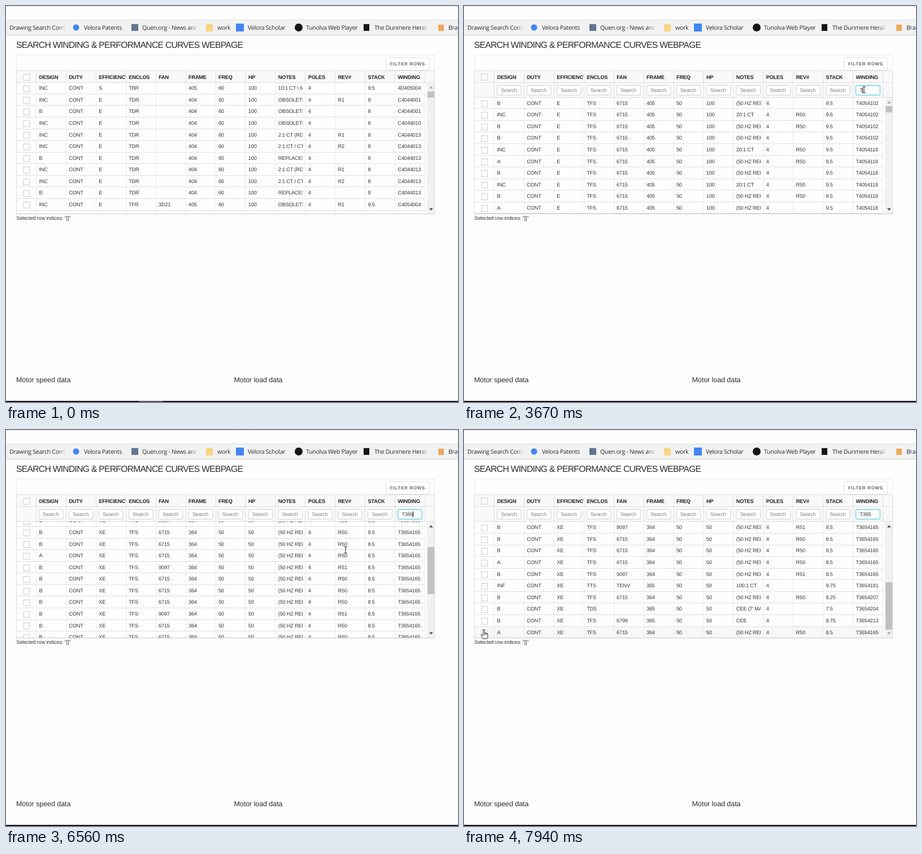
Write an HTML page that moves like this. It is 800 px wide and 700 px high and loops after 8000 ms.

```html
<!DOCTYPE html>
<html lang="en">
<head>
<meta charset="utf-8">
<title>Winding search</title>
<style>
html, body { margin: 0; width: 100%; height: 100%; overflow: hidden; background: #fefefe; }
svg { display: block; width: 800px; height: 700px; }
text { font: 9.2px 'Liberation Sans', Arial, sans-serif; letter-spacing: -.18px; fill: #363636; white-space: pre; text-rendering: geometricPrecision; }
.head { font-weight: bold; letter-spacing: -.22px; fill: #222; }
.title { font-size: 15.6px; letter-spacing: -.67px; fill: #2b2b2b; }
.sub { font-size: 12.5px; letter-spacing: -.06px; fill: #2b2b2b; }
.btn { font-size: 8.1px; font-weight: bold; letter-spacing: .63px; fill: #686868; }
.mark { font: 10.6px 'Open Sans', 'Noto Sans', sans-serif; letter-spacing: -.3px; fill: #2c2c2c; }
.hint { fill: #808080; }
.line { shape-rendering: crispEdges; }
</style>
</head>
<body>
<svg id="stage" viewBox="0 0 800 700" xmlns="http://www.w3.org/2000/svg">
  <defs>
    <linearGradient id="fade"><stop offset="0" stop-color="#f2f2f2" stop-opacity="0"/><stop offset="1" stop-color="#f2f2f2"/></linearGradient>
    <clipPath id="view"><rect id="viewRect" x="18" width="728"/></clipPath>
    <clipPath id="notes"><rect x="477" y="-50" width="48.2" height="900"/></clipPath>
    <clipPath id="eff"><rect x="159" y="110" width="54" height="30"/></clipPath>
  </defs>
</svg>
<script>
const NS = 'http://www.w3.org/2000/svg';
const stage = document.getElementById('stage');
const LOOP = 8000, ROW = 20.58, COL = 52.92, COL0 = 53.6, TOP = 135.2, FILTER = 26.46, BOTTOM = 368.2;
const MAX_SCROLL = 225.7;
const NAMES = 'DESIGN DUTY EFFICIENCY ENCLOS FAN FRAME FREQ HP NOTES POLES REV# STACK WINDING'.split(' ');
const colX = i => COL0 + COL * i;

function el(tag, attrs, parent = stage) {
  const e = document.createElementNS(NS, tag);
  for (const k in attrs) e.setAttribute(k, attrs[k]);
  parent.appendChild(e);
  return e;
}
function label(s, x, y, cls = '', parent = stage) {
  const e = el('text', { x, y, class: cls }, parent);
  e.textContent = s;
  return e;
}
const box = (x, y, width, height, fill, parent) =>
  el('rect', { x, y, width, height, fill, class: 'line' }, parent);
const disc = (cx, cy, r, fill) => el('circle', { cx, cy, r, fill });
const show = (e, on) => e.setAttribute('display', on ? 'inline' : 'none');
const check = (cy, parent) => el('rect', { x: 31, y: cy - 5.2, width: 10.6, height: 10.6, fill: '#fff', stroke: '#d6d6d6', 'stroke-width': 1.3 }, parent);

// Browser chrome
box(0, 0, 800, 1, '#dcdcdc');
box(0, 24, 800, 28, '#f2f2f2');
box(0, 24, 800, 1, '#dedede');
box(0, 51, 800, 1, '#cfcfcf');

function bookmark(s, x, end) {
  label(s, x, 42, 'mark');
  if (!end) return;
  el('rect', { x: end - 14, y: 27, width: 14, height: 22, fill: 'url(#fade)' });
  box(end, 27, 30, 22, '#f2f2f2');
}
bookmark('Drawing Search Comp', 6, 106);
bookmark('Velora Patents', 138);
bookmark('Quen.org - News and', 241, 339);
bookmark('work', 374);
bookmark('Velora Scholar', 428);
bookmark('Tunolva Web Player', 531);
bookmark('The Dunmere Herald', 652, 747);
bookmark('Bram', 783);
disc(124, 38, 5.5, '#4285f4');
box(222, 32, 12, 12, '#5d7690');
el('path', { d: 'M354 32h10l2 2v11h-12z', fill: '#f8d581' });
box(407, 31, 14, 14, '#4285f4');
disc(518, 38, 7, '#151515');
box(633, 32, 10, 12, '#151515');
box(765, 33, 10, 11, '#efa95c');

// Page
label('SEARCH WINDING & PERFORMANCE CURVES WEBPAGE', 18, 74, 'title');
label('Selected row indices: "[]"', 18.2, 378.3);
label('Motor speed data', 18, 664.5, 'sub');
label('Motor load data', 403.5, 664.5, 'sub');
box(0, 698, 800, 2, '#121212');
const task = box(235, 698, 43, 2, '#555');

el('rect', { x: 18.5, y: 86.5, width: 740, height: 28, fill: '#fefefe', stroke: '#ebebeb' });
const button = el('rect', { x: 672.5, y: 91.5, width: 77, height: 22, rx: 2, fill: '#fff', stroke: '#e0e0e0' });
label('FILTER ROWS', 679.8, 105, 'btn');

// Table rows
const xe = (design, fan, rev) => `${design}|CONT|XE|TFS|${fan}|364|50|50|(50 HZ REF|4|${rev}|8.5|T3654165`;
const tdr = (design, notes, rev, winding) => `${design}|CONT|E|TDR||404|60|100|${notes}|4|${rev}|8|${winding}`;
const tfs = (design, duty, notes, rev) => `${design}|${duty}|S|TFS|5117|364|50|50|${notes}|4|${rev}|7.75|T3644131`;
const big = (design, notes, rev, winding) => `${design}|CONT|E|TFS|6715|405|50|100|${notes}|4|${rev}|9.5|${winding}`;
const trio = [tdr('INC', '2:1 CT (RD', 'R1', 'C4044013'), tdr('INC', '2:1 CT / CT', 'R2', 'C4044013'), tdr('B', 'REPLACES', '', 'C4044013')];

const sets = [
  ['INC|CONT|S|TBR||405|60|100|10:1 CT \\ 60|4||9.5|4D405004',
    tdr('INC', 'OBSOLETE', 'R1', 'C4044001'), tdr('B', 'OBSOLETE', '', 'C4044001'), tdr('INC', 'OBSOLETE', '', 'C4044010'),
    ...trio, ...trio,
    'INC|CONT|E|TFR|3D21|405|60|100|OBSOLETE|4|R1|9.5|C4054004', ''],
  ['B', 'INC', 'B', 'B', 'INC', 'A', 'B', 'INC', 'B', 'A'].map((d, i) =>
    big(d, d === 'INC' ? '20:1 CT' : '(50 HZ REF', i % 3 ? 'R50' : '', i < 4 ? 'T4054102' : 'T4054118')),
  ['B|CONT|IE2|TDS||364|50|50|(50 HZ REF|4|R50|6|T3644126',
    'INC|CONT|IE2|TFS|5117|364|50|50|20:1 CT|4||7.75|T3644150',
    tfs('INC', 'CONT', '10:1 CT (50', 'R51'),
    'INF|CONT|S|TBS|5117|364|50|50|2-100:1 CT|4|R52|7.75|T3644131',
    'INF|60 M|S|TTS|TENV|364|50|50|100:1 CT -|4|R53|7.75|T3644131',
    ...Array(3).fill(tfs('INF', 'SPL', '100:1 CT (6', 'R54')),
    tfs('INC', 'SPL', '20:1 CT (60', 'R50'), tfs('INC', 'CONT', '10:1 CT (50', 'R51')],
  [xe('B', '6715', 'R50'),
    'INF|CONT|IE2|TFS|5117|364|50|50|100:1 CT|4||8.75|T3654228',
    ...[...'A9BBA9BBB9BBA9'].map(c => c === '9' ? xe('B', '9097', 'R51') : xe(c, '6715', 'R50')),
    'INF|CONT|XE|TTS|TENV|365|50|50|100:1 CT|4||9.75|T3654181',
    'B|CONT|XE|TFS|6715|364|50|50|(50 HZ REF|4|R50|8.25|T3654207',
    "B|CONT|XE|TDS||365|50|50|CEE (7' MAX|4||7.5|T3654204",
    'B|CONT|XE|TFS|6799|365|50|50|CEE|4||9.75|T3654213',
    xe('A', '6715', 'R50')]
];

const view = el('g', { 'clip-path': 'url(#view)' });
const viewRect = document.getElementById('viewRect');
const body = el('g', {}, view);
const hover = box(19, 0, 723, ROW - 1, '#f7f7f7', body);

function buildSet(rows) {
  const g = el('g', {}, body);
  const h = rows.length * ROW;
  for (let i = 0; i <= 13; i++) box(colX(i) - .6, 0, 1, h, '#ebebeb', g);
  rows.forEach((row, r) => {
    const y = r * ROW;
    box(19, y + ROW - 1, 723, 1, '#dfdfdf', g);
    check(y + 10.9, g);
    row.split('|').forEach((s, i) => {
      if (!s) return;
      const t = label(s, colX(i) + 4.8, y + 13, '', g);
      if (i === 8) t.setAttribute('clip-path', 'url(#notes)');
    });
  });
  return g;
}
const tables = sets.map(buildSet);

// Scrollbar
const track = box(745, 0, 14, 1, '#f1f1f1');
const thumb = box(746, 0, 12, 11, '#c1c1c1');
const upArrow = el('path', { d: 'M-3.5 2L0 -2L3.5 2z' });
const downArrow = el('path', { d: 'M-3.5 -2L0 2L3.5 -2z', transform: 'translate(752.3 359.5)' });

// Header and filter row
box(19, 115, 740, 20, '#f9f9f9');
box(18, 114, 741, 1, '#dedede');
const filter = el('g', {});
box(19, 135, 740, 27, '#f9f9f9', filter);
box(18, 135, 741, 1, '#dddddd');
check(125.8);
const hints = [];
NAMES.forEach((s, i) => {
  const x = colX(i);
  const t = label(s, x + 4.9, 129.2, 'head');
  if (i === 2) t.setAttribute('clip-path', 'url(#eff)');
  el('rect', { x: x + 5, y: 140.5, width: 42.6, height: 17, rx: 2, fill: '#fff', stroke: '#cfcfcf' }, filter);
  hints.push(label('Search', x + 11.7, 152, 'hint', filter));
});
for (let i = 0; i <= 13; i++) {
  box(colX(i) - .6, 115, 1, 20, '#dedede');
  box(colX(i) - .6, 136, 1, 26, '#e2e2e2', filter);
}
box(18, 161, 741, 1, '#dddddd', filter);
const field = filter.querySelectorAll('rect[rx]')[12];
const query = label('', colX(12) + 11.7, 152, '', filter);
const caret = box(0, 144, 1, 10, '#111', filter);

box(18, 114, 1, 254, '#dcdcdc');
box(758, 114, 1, 254, '#dcdcdc');
box(18, 367, 741, 1, '#cbcbcb');

// Pointers, each with its hot spot at 0,0
const pointers = {
  arrow: el('path', { d: 'M0 0V13.5L3.2 10.6L5.3 15.4L7.4 14.5L5.3 9.8H9.6z', fill: '#fff', stroke: '#111', 'stroke-width': .9 }),
  hand: el('path', {
    d: 'M-1.2 1Q-1.2 -.4 0 -.4T1.2 1V5.6Q2.4 4.8 3.2 6Q4.3 5.3 5 6.6Q6.6 6.2 6.8 8V11.5L5.4 16H-1.6L-4.6 10.8Q-5.6 9.2 -4.6 8.6Q-3.6 8.2 -1.2 10.6zM1.2 6V9M3.2 6.4V9M5 7V9',
    fill: '#fff', stroke: '#111', 'stroke-width': .9, 'stroke-linejoin': 'round' }),
  beam: el('path', { d: 'M-2.7 -5.5H-1Q0 -5.5 0 -4.5Q0 -5.5 1 -5.5H2.7M0 -4.5V4.5M-2.7 5.5H-1Q0 5.5 0 4.5Q0 5.5 1 5.5H2.7', fill: 'none', stroke: '#222', 'stroke-width': 1 })
};

// Moves: first change, last change, steps, end values, pointer at rest
const pointerMoves = [
  [150, 590, 8, [569, 319], 'arrow'],
  [840, 1030, 4, [696, 145.5], 'beam'],
  [1210, 1520, 6, [698.5, 93.5], 'hand'],
  [1790, 2160, 6, [700.5, 129], 'hand'],
  [2230, 2420, 4, [708, 148], 'beam'],
  [5720, 6240, 7, [601, 212], 'beam'],
  [7000, 7310, 5, [118, 296], 'beam'],
  [7490, 7940, 8, [35.3, 353], 'hand']
];
const scrollMoves = [[6490, 6670, 4, [146]], [6740, 7240, 8, [MAX_SCROLL]]];

function follow(moves, start, t) {
  let at = start, rest = 'arrow';
  for (const [t0, t1, n, end, kind] of moves) {
    if (t < t0) break;
    const p = Math.min(n, 1 + Math.floor((t - t0) * (n - 1) / (t1 - t0) + .001)) / n;
    at = at.map((v, i) => v + (end[i] - v) * p);
    rest = p < 1 ? 'arrow' : kind;
    if (p < 1) break;
  }
  return { at, rest };
}
// Last value whose time has come
const latest = (keys, t) => keys.reduce((v, [at, next]) => t >= at ? next : v, keys[0][1]);
const typing = [[0, ''], [3670, 'T'], [4730, 'T3'], [4910, 'T36'], [5160, 'T365']];
const blink = [[0, 0], [2620, 1], [3110, 0], [3670, 1], [4180, 0], [4730, 1], [5720, 0], [6240, 1], [6740, 0], [7310, 1], [7810, 0]];
const content = [[0, 0], [3670, 1], [4730, 2], [5160, 3]];
const WIDTHS = [0, 5.4, 10.3, 15.2, 20.1];

function render(t) {
  const filtered = t >= 1790;
  const top = TOP + (filtered ? FILTER : 0);
  const scroll = follow(scrollMoves, [0], t).at[0];
  const { at: [x, y], rest } = follow(pointerMoves, [770, 751], t);
  const set = latest(content, t);
  const text = latest(typing, t);

  show(task, t < 150);
  show(filter, filtered);
  viewRect.setAttribute('y', top);
  viewRect.setAttribute('height', BOTTOM - top);
  body.setAttribute('transform', `translate(0 ${top - scroll})`);
  tables.forEach((g, i) => show(g, i === set));

  const lit = t >= 5720 && (t < 6490 || t >= 7490) && y > top;
  show(hover, lit);
  hover.setAttribute('y', Math.floor((y - top + scroll) / ROW) * ROW);

  track.setAttribute('y', top);
  track.setAttribute('height', BOTTOM - 1 - top);
  thumb.setAttribute('y', top + 15.5 + scroll / MAX_SCROLL * 92);
  thumb.setAttribute('height', set === 3 ? 83.5 : 11);
  upArrow.setAttribute('transform', `translate(752.3 ${top + 8.6})`);
  upArrow.setAttribute('fill', scroll > 0 ? '#505050' : '#a3a3a3');
  downArrow.setAttribute('fill', scroll >= MAX_SCROLL ? '#a3a3a3' : '#505050');

  field.setAttribute('stroke', t >= 2620 ? '#35c3e6' : '#cfcfcf');
  show(hints[12], !text);
  query.textContent = text;
  show(caret, latest(blink, t));
  caret.setAttribute('x', 700 + WIDTHS[text.length]);

  const onButton = x > 672 && x < 750 && y > 91 && y < 114;
  button.setAttribute('stroke', onButton ? '#c4c4c4' : '#e0e0e0');
  const onHeader = y >= 114 && y < 135 && x < 742;
  const onChecks = x < 53 && y > top;
  const kind = onButton || onHeader || onChecks ? 'hand' : rest;
  for (const k in pointers) {
    show(pointers[k], t >= 150 && k === kind);
    pointers[k].setAttribute('transform', `translate(${x} ${y})`);
  }
}

function frame() {
  render(performance.now() % LOOP);
  requestAnimationFrame(frame);
}
frame();
</script>
</body>
</html>
```
